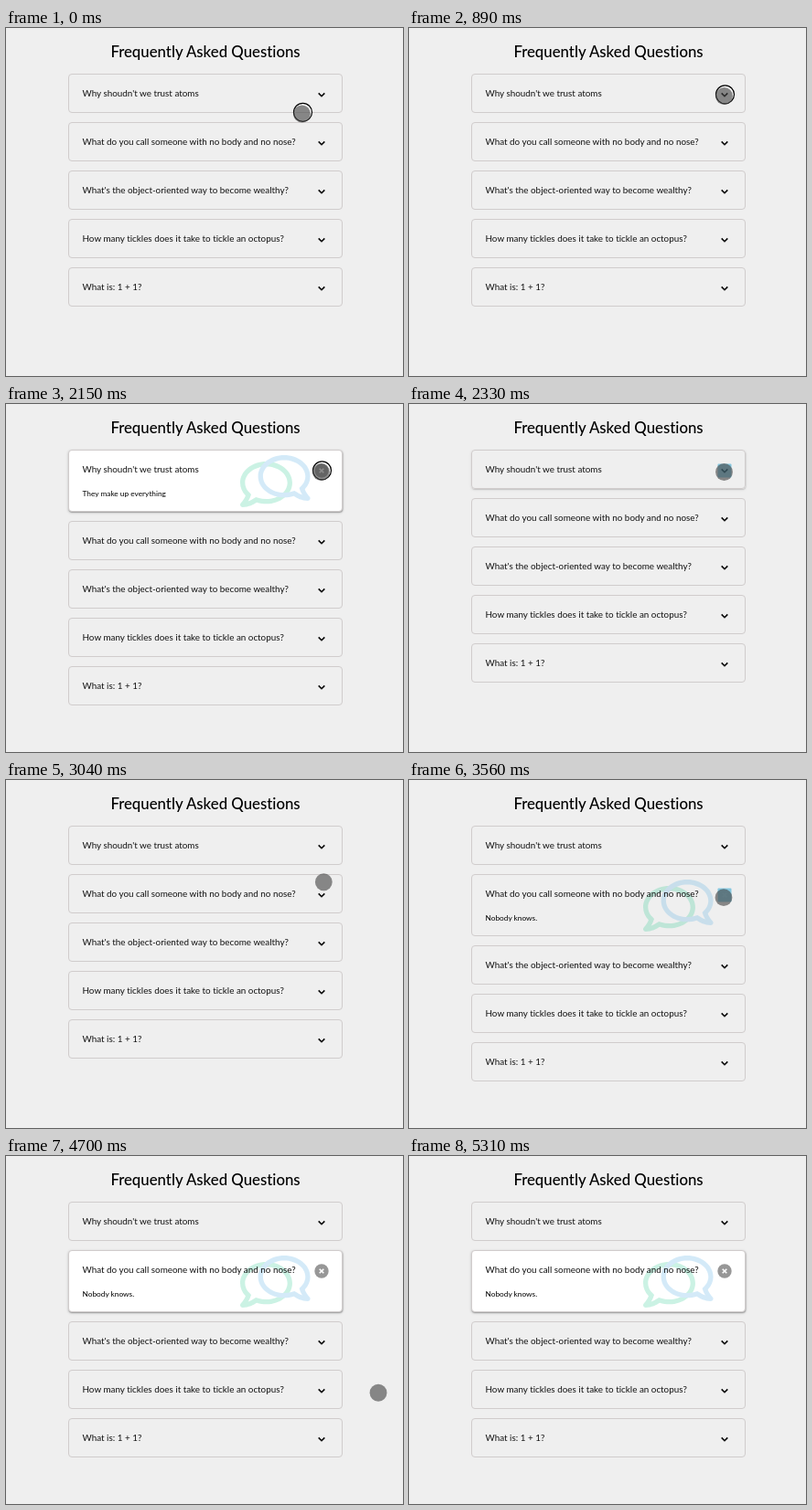
Recreate the animation shown at these times as an HTML page. Size 434x381 px, loop 5840 ms.

```html
<!DOCTYPE html>
<html lang="en">
<head>
<meta charset="utf-8">
<title>Frequently Asked Questions</title>
<style>
  html, body { margin: 0; width: 100%; height: 100%; overflow: hidden; background: #efefef; }
  #stage { position: relative; width: 434px; height: 381px; overflow: hidden; }
  svg {
    position: absolute; overflow: visible;
    font-family: Lato, "Open Sans", sans-serif; font-variant-ligatures: none;
  }
  .layer { left: 0; top: 0; width: 434px; height: 381px; }
  .card {
    position: absolute; left: 68px; width: 300px; box-sizing: border-box;
    border: 1px solid #d0cccc; border-radius: 4px;
  }
  .card svg { left: -1px; top: -1px; width: 300px; height: 68px; }
  .title { font-size: 16.8px; font-weight: 500; text-anchor: middle; }
  .ask { font-size: 9.87px; fill: #111; }
  .reply { font-size: 8.3px; }
  .chevron { fill: none; stroke: #000; stroke-width: 1.6; }
  .cross { fill: none; stroke: #fff; stroke-width: 1.6; }
</style>
</head>
<body>
<div id="stage">
  <svg class="layer"><text class="title" x="218" y="31.5">Frequently Asked Questions</text></svg>
</div>
<script>
const LOOP = 5840;
const FADE = 270;
const stage = document.getElementById('stage');

const faqs = [
  ["Why shoudn't we trust atoms", 'They make up everything'],
  ['What do you call someone with no body and no nose?', 'Nobody knows.'],
  ["What's the object-oriented way to become wealthy?", ''],
  ['How many tickles does it take to tickle an octopus?', ''],
  ['What is: 1 + 1?', '']
];

// when each card opens and closes
const spans = [[980, 2330], [3560, LOOP]];

// cursor legs: first change, last change, steps, start, control, end, easing power
const legs = [
  [90, 450, 5, [323.5, 94], [334, 84], [344.5, 74.5], 1],
  [2690, 3220, 7, [344.5, 74.5], [352, 98], [344, 128.7], 1],
  [3650, 3830, 3, [344, 128.7], [345, 128.5], [346.5, 128], 1],
  [3920, 4440, 7, [346.5, 128], [400, 117], [396.5, 218.5], 1.42],
  [4610, 5220, 8, [396.5, 218.5], [421.5, 300], [414.5, 381.5], 1]
];
const CURSOR_END = 5310;
const presses = [[0, 90], [890, 980], [2150, 2330], [3400, 3560]];

// highlight on the tapped button: start, end, y
const taps = [[980, 1070, 73], [2330, 2420, 73], [3560, 3650, 126]];

const bubble = 'M256 32C115 32 0 125 0 240c0 48 20 91 53 126C38 406 7 439 6 440c-6 7-8 17-4 26s12 14 22 14' +
  'c61 0 110-26 139-46C192 443 223 448 256 448c141 0 256-93 256-208S397 32 256 32z' +
  'm0 368c-27 0-53-4-78-12l-23-7-20 13c-14 10-34 22-57 29 7-12 14-25 20-40l10-28-20-22' +
  'C70 314 48 282 48 240c0-88 93-160 208-160s208 72 208 160-93 160-208 160z';

const cards = faqs.map(([ask, reply]) => {
  const el = document.createElement('div');
  el.className = 'card';
  el.innerHTML = `<svg>
    <g class="open">
      <g opacity=".2">
        <path d="${bubble}" fill="#00c07c" transform="translate(188 9.5) scale(.1113)"/>
        <path d="${bubble}" fill="#2f9ce0" transform="translate(264.6 2.5) scale(-.1113 .1113)"/>
      </g>
      <text class="reply" x="15.5" y="51">${reply}</text>
      <circle class="button" cx="277" cy="23" r="7.7" fill="#979797"/>
      <path class="cross" d="M274.7 20.7l4.6 4.6m0-4.6l-4.6 4.6"/>
    </g>
    <path class="chevron" d="M273.7 21.4l3.3 3.3 3.3-3.3"/>
    <text class="ask" x="15.5" y="25">${ask}</text>
  </svg>`;
  stage.append(el);
  const part = name => el.querySelector('.' + name);
  return { el, open: part('open'), button: part('button'), chevron: part('chevron') };
});

stage.insertAdjacentHTML('beforeend', `<svg class="layer">
  <rect id="tap" x="337.5" width="15" height="15" rx="1" fill="#1b9fd0" fill-opacity=".5"/>
  <g id="cursor">
    <g id="ring" fill="none">
      <circle cx="1" cy="-1.7" r="9.1" stroke="#fff" stroke-width="1.5"/>
      <circle cx="1" cy="-1.7" r="10" stroke="#000" stroke-width="1.2"/>
    </g>
    <circle r="9.4" fill="#464646" fill-opacity=".62"/>
  </g>
</svg>`);
const [tap, cursor, ring] = ['tap', 'cursor', 'ring'].map(id => document.getElementById(id));

const within = (t, [from, to]) => t >= from && t < to;
const show = (el, on) => { el.style.display = on ? '' : 'none'; };
const clamp = v => Math.max(0, Math.min(1, v));

function cursorAt(t) {
  let pos = legs[0][3];
  for (const [from, to, steps, a, c, b, power] of legs) {
    if (t < from) break;
    // steps fall on whole hundredths of a second, so allow a little slack
    const gap = (to - from) / (steps - 1);
    const step = Math.floor((t - from) / gap + 0.1) + 1;
    const u = Math.min(1, step / steps) ** power;
    const v = 1 - u;
    pos = a.map((p, i) => v * v * p + 2 * u * v * c[i] + u * u * b[i]);
  }
  return pos;
}

function drawCards(t) {
  let top = 50;
  cards.forEach(({ el, open, button, chevron }, i) => {
    const span = spans[i] || [LOOP, LOOP];
    const isOpen = within(t, span);
    const fade = isOpen ? clamp(Math.floor((t - span[0]) / 90) * 90 / FADE) : 0;
    const closing = within(t, [span[1], span[1] + 90]);
    const shade = closing ? 0.5 : fade;
    const height = isOpen ? 68 : 43;
    el.style.top = top + 'px';
    el.style.height = height + 'px';
    el.style.background = `rgba(255,255,255,${fade})`;
    el.style.boxShadow = `0 1px 3px rgba(0,0,0,${0.22 * shade}), 0.5px 1px 1px rgba(0,0,0,${0.2 * shade})`;
    show(open, isOpen);
    show(chevron, !isOpen);
    button.style.opacity = fade;
    top += height + 10;
  });
}

function drawCursor(t) {
  show(cursor, t < CURSOR_END);
  show(ring, presses.some(p => within(t, p)));
  cursor.setAttribute('transform', `translate(${cursorAt(t)})`);
  const hit = taps.find(p => within(t, p));
  show(tap, hit);
  if (hit) tap.setAttribute('y', hit[2] - 7.5);
}

function draw(t) {
  drawCards(t);
  drawCursor(t);
}

const start = performance.now();
function tick(now) {
  draw(Math.max(0, now - start) % LOOP);
  requestAnimationFrame(tick);
}
draw(0);
requestAnimationFrame(tick);
</script>
</body>
</html>
```
